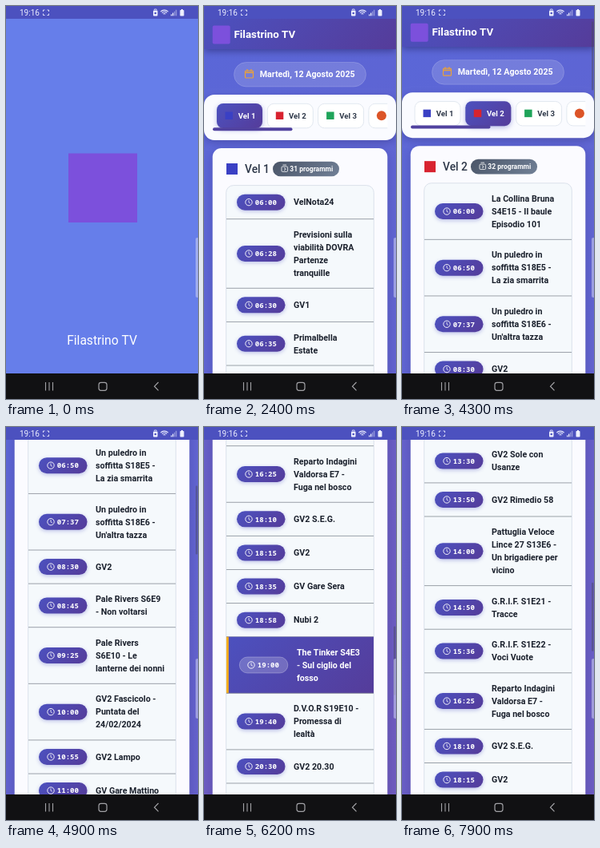
An HTML page with a canvas for the animation above (8000 ms loop, 240x492 px).

```html
<!DOCTYPE html>
<html lang="it">
<head>
<meta charset="utf-8">
<title>Filastrino TV</title>
<style>
html, body { margin: 0; width: 100%; height: 100%; overflow: hidden; background: #000; }
canvas { display: block; width: 100%; height: 100%; }
</style>
</head>
<body>
<canvas id="stage"></canvas>
<script>
const W = 240, H = 492, TOP = 16, NAV = 460, LOOP = 8000;
const PAGE_H = 2300, TABLE_Y = 224.6;
const SANS = 'Roboto, sans-serif', MONO = '"Noto Sans Mono", monospace';
const APP = 'Filastrino TV';
const OPEN = 900, SWITCH = 3790;
const ROW_H = [0, 42.1, 54.6, 70.6, 86.6];

const canvas = document.getElementById('stage');
const ctx = canvas.getContext('2d');

const parse = list => list.trim().split('\n').map(line => {
  const [time, ...lines] = line.trim().split('|');
  return { time, lines };
});

const channels = [
  { name: 'Vel 1', color: '#3a40c4', badge: '31 programmi', rows: parse(`
    06:00|VelNota24
    06:28|Previsioni sulla|viabilità DOVRA|Partenze|tranquille
    06:30|GV1
    06:35|Primalbella|Estate
    08:00|GV1`) },
  { name: 'Vel 2', color: '#d8232f', badge: '32 programmi', now: '19:00', rows: parse(`
    06:00|La Collina Bruna|S4E15 - Il baule|Episodio 101
    06:50|Un puledro in|soffitta S18E5 -|La zia smarrita
    07:37|Un puledro in|soffitta S18E6 -|Un'altra tazza
    08:30|GV2
    08:45|Pale Rivers S6E9|- Non voltarsi
    09:25|Pale Rivers|S6E10 - Le|lanterne dei nonni
    10:00|GV2 Fascicolo -|Puntata del|24/02/2024
    10:55|GV2 Lampo
    11:00|GV Gare Mattino
    11:10|Pale Rivers|S6E11 - La soglia
    12:00|Pale Rivers|S6E12 - Il conto|alla rovescia
    13:00|GV2 Mezzodì
    13:30|GV2 Sole con|Usanze
    13:50|GV2 Rimedio 58
    14:00|Pattuglia Veloce|Lince 27 S13E6 -|Un brigadiere per|vicino
    14:50|G.R.I.F. S1E21 -|Tracce
    15:36|G.R.I.F. S1E22 -|Voci Vuote
    16:25|Reparto Indagini|Valdorsa E7 -|Fuga nel bosco
    18:10|GV2 S.E.G.
    18:15|GV2
    18:35|GV Gare Sera
    18:58|Nubi 2
    19:00|The Tinker S4E3|- Sul ciglio del|fosso
    19:40|D.V.O.R S19E10 -|Promessa di|lealtà
    20:30|GV2 20.30
    21:00|Su... Saltiamo sul|carro! In Valle -|Puntata 4
    23:00|GV2 Notte`) },
  { name: 'Vel 3', color: '#1fa45a' }
];

const clamp = v => Math.max(0, Math.min(1, v));

// CSS "ease" curve
function ease(x) {
  x = clamp(x);
  let a = 0, b = 1, u = x;
  for (let i = 0; i < 20; i++) {
    u = (a + b) / 2;
    const px = 3 * u * (1 - u) * (1 - u) * .25 + 3 * u * u * (1 - u) * .25 + u * u * u;
    px < x ? a = u : b = u;
  }
  return 3 * u * (1 - u) * (1 - u) * .1 + 3 * u * u * (1 - u) + u * u * u;
}

const scrollKeys = [[4250, 0], [4900, 281.8], [5700, 929.8], [6350, 1222], [6600, 1227.3], [6900, 1227.3], [7900, 910.8], [8200, 820]];

function slope(i) {
  const k = scrollKeys;
  if (i === 0 || i === k.length - 1) return 0;
  const a = (k[i][1] - k[i - 1][1]) / (k[i][0] - k[i - 1][0]);
  const b = (k[i + 1][1] - k[i][1]) / (k[i + 1][0] - k[i][0]);
  return a * b <= 0 ? 0 : 2 * a * b / (a + b);
}

function scrollAt(t) {
  const k = scrollKeys;
  if (t <= k[0][0]) return 0;
  const i = k.findIndex((p, n) => n < k.length - 1 && t < k[n + 1][0]);
  const d = k[i + 1][0] - k[i][0], u = (t - k[i][0]) / d, v = 1 - u;
  return k[i][1] * v * v * (1 + 2 * u) + k[i + 1][1] * u * u * (3 - 2 * u)
    + slope(i) * d * u * v * v - slope(i + 1) * d * u * u * v;
}

function gradient(x, y, w, h, from, to) {
  const cx = x + w / 2, cy = y + h / 2, r = (w + h) / 4;
  const g = ctx.createLinearGradient(cx - r, cy - r, cx + r, cy + r);
  g.addColorStop(0, from);
  g.addColorStop(1, to);
  return g;
}
const accent = (x, y, w, h) => gradient(x, y, w, h, '#4c51bf', '#553c9a');

function box(x, y, w, h, r, fill, stroke, line = .7) {
  ctx.beginPath();
  ctx.roundRect(x, y, w, h, r);
  if (fill) { ctx.fillStyle = fill; ctx.fill(); }
  if (stroke) { ctx.strokeStyle = stroke; ctx.lineWidth = line; ctx.stroke(); }
}

function shadowed(color, blur, dy, draw) {
  const k = canvas.width / W;
  ctx.save();
  ctx.shadowColor = color;
  ctx.shadowBlur = blur * k;
  ctx.shadowOffsetY = dy * k;
  draw();
  ctx.restore();
}

function text(str, x, y, size, weight, color, family = SANS, align = 'left') {
  ctx.font = `${weight} ${size}px ${family}`;
  ctx.textAlign = align;
  ctx.fillStyle = color;
  ctx.fillText(str, x, y);
}

function path(points, color, width) {
  ctx.beginPath();
  points.forEach(([x, y], i) => i ? ctx.lineTo(x, y) : ctx.moveTo(x, y));
  ctx.strokeStyle = color;
  ctx.lineWidth = width;
  ctx.stroke();
}

function disc(x, y, r, fill, stroke, width = .9) {
  ctx.beginPath();
  ctx.arc(x, y, r, 0, Math.PI * 2);
  if (fill) { ctx.fillStyle = fill; ctx.fill(); }
  if (stroke) { ctx.strokeStyle = stroke; ctx.lineWidth = width; ctx.stroke(); }
}

function drawStatus() {
  ctx.fillStyle = '#4c51bf';
  ctx.fillRect(0, 0, W, TOP);
  const ink = '#eef0ff';
  text('19:16', 17, 12, 10, 400, ink);
  for (const [x, sx] of [[46.5, 1], [53.5, -1]])
    for (const [y, sy] of [[5, 1], [11.5, -1]])
      path([[x, y + 2 * sy], [x, y], [x + 2 * sx, y]], ink, .9);
  box(184, 5.5, 5.5, 7, 1, ink);
  path([[185.4, 5], [185.4, 4], [188.1, 4], [188.1, 5]], ink, .8);
  disc(186.7, 9, 1.3, '#4c51bf');
  for (const r of [2, 4.2, 6.4]) {
    ctx.beginPath();
    ctx.arc(198, 11.5, r, -Math.PI * .76, -Math.PI * .24);
    ctx.strokeStyle = ink;
    ctx.lineWidth = 1.1;
    ctx.stroke();
  }
  ctx.fillStyle = ink;
  for (let i = 0; i < 4; i++) {
    ctx.globalAlpha = i < 2 ? 1 : .45;
    ctx.fillRect(206 + i * 2, 10.5 - i * 1.9, 1.3, 1.8 + i * 1.9);
  }
  ctx.globalAlpha = 1;
  box(217.5, 5, 5, 7.5, .8, ink);
  ctx.fillRect(219, 4, 2, 1);
}

function drawNav() {
  ctx.fillStyle = '#111113';
  ctx.fillRect(0, NAV, W, H - NAV);
  const ink = '#a2a2a6';
  for (const x of [49.5, 54, 58.5]) path([[x, 471], [x, 481.5]], ink, 1.1);
  box(116, 471.3, 10, 10, 2.8, null, ink, 1.2);
  path([[190.5, 471], [185.5, 476.2], [190.5, 481.4]], ink, 1.2);
}

function drawSplash() {
  ctx.fillStyle = '#667eea';
  ctx.fillRect(0, TOP, W, NAV - TOP);
  ctx.fillStyle = '#7c50dc';
  ctx.fillRect(78, 184.5, 86, 86.5);
  text(APP, 120, 423.5, 15.6, 400, '#fff', SANS, 'center');
}

function drawHeader() {
  shadowed('rgba(20,15,70,.45)', 9, 2.5, () => {
    ctx.fillStyle = accent(0, TOP, W, 38);
    ctx.fillRect(0, TOP, W, 38);
  });
  box(10.7, 24.5, 22, 23, 2, '#7c50dc');
  text(APP, 37.5, 40, 13.33, 700, '#fff');

  box(37.5, 70.5, 165, 30.5, 15.2, 'rgba(255,255,255,.15)', 'rgba(255,255,255,.25)');
  box(51.5, 81, 10, 9, 1, null, '#e9a13b', 1.2);
  path([[51.5, 83.3], [61.5, 83.3]], '#e9a13b', 1.6);
  path([[54, 79], [54, 82]], '#e9a13b', 1.2);
  path([[59, 79], [59, 82]], '#e9a13b', 1.2);
  text('Martedì, 12 Agosto 2025', 69.7, 89.3, 10.67, 700, '#fff');
}

function drawTabs(sel) {
  shadowed('rgba(20,15,70,.25)', 10, 3, () => box(0, 111, W, 57, 13, '#fafbff'));
  ctx.save();
  ctx.beginPath();
  ctx.rect(10.7, 111, 218.6, 57);
  ctx.clip();
  for (let i = 0; i < 4; i++) {
    const x = 16 + i * 63.3, ch = channels[i];
    box(x, 122.3, 57, 30.5, 8, '#fff', '#e2e8f0', 1);
    const on = i === 0 ? 1 - sel : i === 1 ? sel : 0;
    if (on) {
      ctx.globalAlpha *= on;
      shadowed('rgba(76,81,191,.4)', 6, 2, () => box(x, 122, 57, 31, 8, accent(x, 122, 57, 31)));
      ctx.globalAlpha = 1;
    }
    if (!ch) { disc(x + 16, 137.3, 6, '#dc5427'); continue; }
    ctx.fillStyle = ch.color;
    ctx.fillRect(x + 10.5, 132.5, 9.5, 9.5);
    text(ch.name, x + 26.7, 140.8, 9.6, 700, on > .5 ? '#fff' : '#2d3748');
  }
  ctx.restore();
  box(11, 152.3, 99.5, 4, 2, '#51429f');
}

function drawClock(x, y) {
  disc(x, y, 4.2, null, '#fff');
  path([[x, y - 2.6], [x, y + .2], [x + 1.8, y + 1.2]], '#fff', .8);
}

function drawRow(row, y, h, current) {
  const cy = y + h / 2, dx = current ? 3 : 0;
  if (current) {
    ctx.fillStyle = accent(28, y, 184, h);
    ctx.fillRect(28, y, 184, h);
    ctx.fillStyle = '#f6ad1b';
    ctx.fillRect(28, y, 2.8, h);
    box(44.3, cy - 10, 60.5, 20, 10, 'rgba(255,255,255,.2)', 'rgba(255,255,255,.4)');
  } else {
    shadowed('rgba(76,81,191,.35)', 5, 1.6, () =>
      box(41, cy - 10, 60.5, 20, 10, accent(41, cy - 10, 60.5, 20)));
  }
  drawClock(56 + dx, cy);
  text(row.time, 63.8 + dx, cy + 3.3, 9.07, 700, '#fff', MONO);
  const first = cy + 3.8 - (row.lines.length - 1) * 8;
  row.lines.forEach((s, i) =>
    text(s, 112 + dx * 1.3, first + i * 16, 10.67, 700, current ? '#fff' : '#1a202c'));
}

function drawPanel(ch, scroll) {
  const tableH = ch.rows.reduce((sum, r) => sum + ROW_H[r.lines.length], 0);
  const bottom = Math.max(tableH, 420);
  shadowed('rgba(20,15,70,.2)', 12, 4, () =>
    box(10.7, 178, 218.6, TABLE_Y - 178 + bottom + 16, 11, '#fbfbff'));

  ctx.fillStyle = ch.color;
  ctx.fillRect(28, 197, 14, 14);
  text(ch.name, 51, 209.3, 13.8, 500, '#2d3748');
  box(86, 194.7, 83, 18.6, 9.3, gradient(86, 195, 83, 18, '#4a5568', '#718096'));
  box(97, 201, 7.6, 6.4, 1.2, null, '#fff', .8);
  path([[98.5, 199], [103, 199]], '#fff', .8);
  path([[100, 202.6], [102.3, 204.2], [100, 205.8]], '#fff', .8);
  text(ch.badge, 107.3, 207.2, 8.53, 700, '#fff');

  box(27.7, TABLE_Y, 184.6, bottom, 9, '#f5f9fc', '#d3dbe6', .8);
  let y = TABLE_Y;
  for (const row of ch.rows) {
    const h = ROW_H[row.lines.length];
    if (y - scroll < NAV + 20 && y + h - scroll > -20) {
      drawRow(row, y, h, row.time === ch.now);
      path([[28, y + h], [212, y + h]], '#7d838d', .75);
    }
    y += h;
  }
}

// Draws the panel on its own layer so that it fades as one piece.
const layer = document.createElement('canvas').getContext('2d');
function fadePanel(ch, scroll, p) {
  if (p >= 1) { drawPanel(ch, scroll); return; }
  const image = layer.canvas;
  image.width = canvas.width;
  image.height = canvas.height;
  const matrix = ctx.getTransform();
  ctx.save();
  ctx.setTransform(1, 0, 0, 1, 0, 0);
  layer.drawImage(canvas, 0, 0);
  ctx.setTransform(matrix);
  ctx.translate(0, 13.3 * (1 - p));
  drawPanel(ch, scroll);
  ctx.setTransform(1, 0, 0, 1, 0, 0);
  ctx.globalAlpha = 1 - p;
  ctx.drawImage(image, 0, 0);
  ctx.restore();
}

function drawPage(t) {
  const scroll = scrollAt(t);
  ctx.save();
  ctx.beginPath();
  ctx.rect(0, TOP, W, NAV - TOP);
  ctx.clip();
  ctx.translate(0, -scroll);
  ctx.fillStyle = gradient(0, TOP, W, PAGE_H, '#5a67d8', '#7555b5');
  ctx.fillRect(0, TOP, W, PAGE_H);
  if (scroll < 200) {
    drawHeader();
    drawTabs(clamp((t - SWITCH) / 100));
  }
  const second = t >= SWITCH;
  fadePanel(channels[second ? 1 : 0], scroll, ease((t - (second ? SWITCH : OPEN + 150)) / 500));
  ctx.restore();

  if (scroll > 0) {
    const k = (NAV - TOP) / PAGE_H;
    box(237, TOP + 3 + scroll * k, 2.4, 86, 1.2, 'rgba(70,70,90,.45)');
  }
}

function frame(now) {
  const t = now % LOOP;
  const dpr = window.devicePixelRatio || 1;
  const w = Math.round(innerWidth * dpr), h = Math.round(innerHeight * dpr);
  if (canvas.width !== w || canvas.height !== h) { canvas.width = w; canvas.height = h; }
  ctx.setTransform(w / W, 0, 0, h / H, 0, 0);
  ctx.globalAlpha = 1;

  if (t < OPEN) drawSplash();
  else drawPage(t);
  box(237, 290, 4, 75, 2, 'rgba(205,210,240,.55)');
  drawStatus();
  drawNav();
  requestAnimationFrame(frame);
}
requestAnimationFrame(frame);
</script>
</body>
</html>
```
